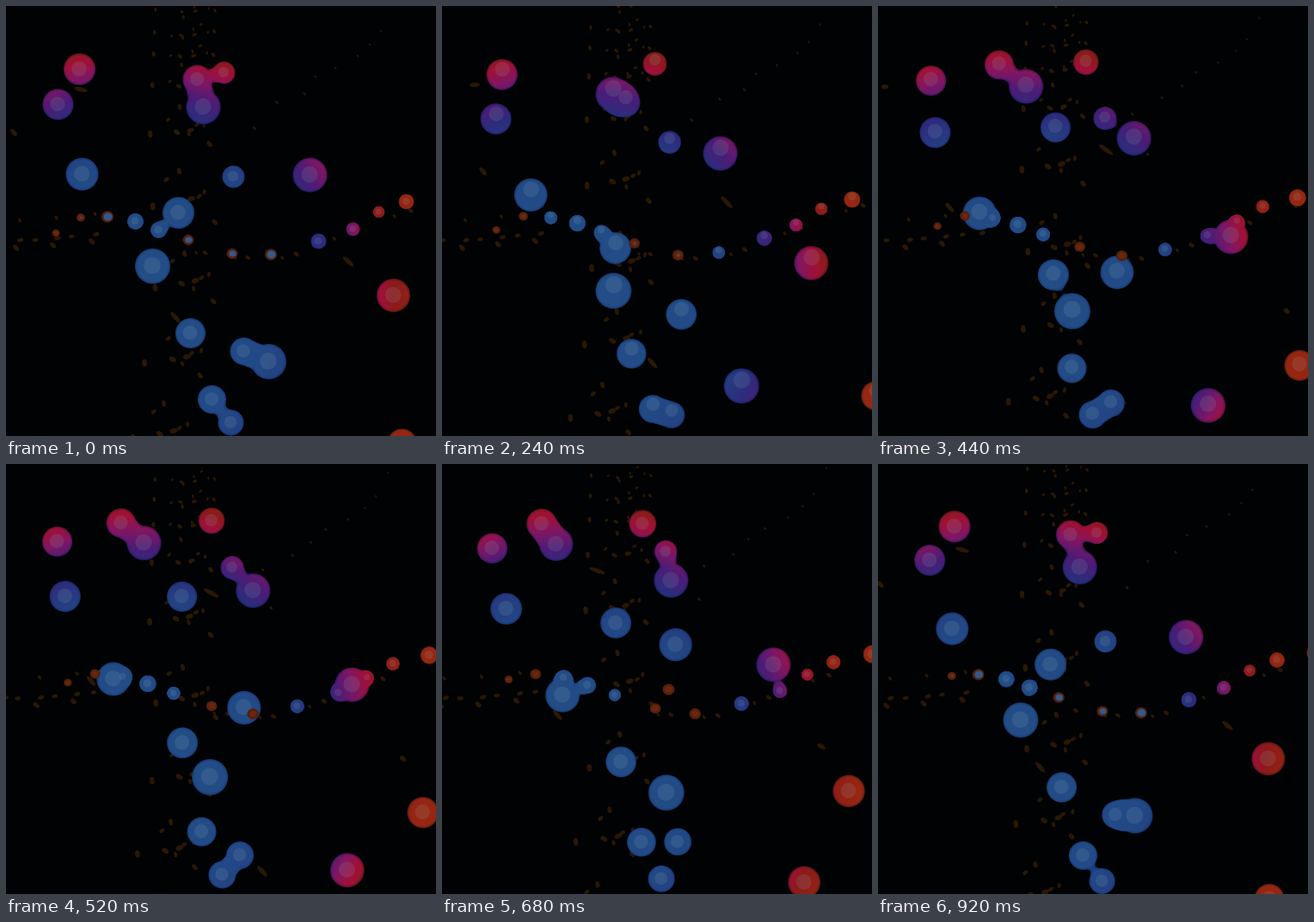
An HTML page with a canvas for the animation above (0.96 s loop, 500x500 px).

```html
<!DOCTYPE html>
<html lang="en">
<head>
<meta charset="utf-8">
<title>Metaball streams</title>
<style>
  html, body { margin: 0; width: 100%; height: 100%; overflow: hidden; background: #010203; }
  canvas { display: block; width: 500px; height: 500px; }
</style>
</head>
<body>
<canvas id="stage" width="500" height="500"></canvas>
<script>
const SIZE = 500, LOOP = 960, STEP = 40;
const SPREAD = 1.6;                              // reach of a ball relative to its radius
const EDGE = (1 - 1 / SPREAD ** 2) ** 2;         // field value on the surface
const TAU = Math.PI * 2;

const ctx = document.getElementById('stage').getContext('2d');
const layer = document.createElement('canvas');
layer.width = layer.height = SIZE;
const layerCtx = layer.getContext('2d');
const image = layerCtx.createImageData(SIZE, SIZE);
const field = new Float32Array(SIZE * SIZE);

const clamp = (v, lo = 0, hi = 1) => Math.min(hi, Math.max(lo, v));

// A path is a row of x, y, r points, one every `step` ms.
// A new ball sets off every loop, so each path carries several at once.
function path(step, points, born = -Infinity, die = Infinity) {
  const n = points.length / 3;
  return { step, points, n, born, die, length: (n - 1) * step };
}

const upperArc = path(480, [
  168, 70, 17,   137, 68, 17,   85, 73, 18.5,  60, 88, 17.5,
  60, 114, 18,   67, 150, 18,   88, 195, 19,   121, 245, 19.5,
  170, 302, 20.5, 231, 359, 21, 305, 413, 20.5, 390, 468, 20,
  460, 508, 17,  520, 545, 17
], 250);

const rightArc = path(480, [
  516, 485, 16,  487, 411, 18,  450, 336, 19.5, 406, 262, 20,
  353, 196, 20,  292, 150, 20,  229, 117, 20,   166, 92, 20,
  92, 98, 19
], -Infinity, 3790);

const spiral = path(480, [
  263, 335, 13,  263, 302, 13,  264, 198, 13,  263, 125, 13.5,
  253, 77, 13,   240, 65, 15,   222, 85, 17,   205, 147, 17.5,
  200, 240, 18.5, 204, 318, 18, 214, 380, 17.5, 226, 424, 17,
  239, 457, 16.5, 250, 476, 16, 261, 484, 15,  271, 458, 16,
  276, 401, 16,  277, 297, 19.5, 262, 95, 18
], 600, 8590);

const beads = path(960, [
  58, 264, 4.5,  87, 246, 5,    118, 245, 7,   150, 250, 9.5,
  177, 260, 9.5, 212, 272, 6.5, 263, 288, 6.5, 308, 289, 7,
  363, 273, 9,   403, 259, 8,   433, 239, 7,   465, 227, 9,
  510, 219, 11
]);

const streaks = [
  path(480, [-110, 0, 5, -60, 70, 5, 9, 147, 5, 91, 243, 7, 197, 362, 8, 290, 465, 8, 380, 560, 8]),
  path(480, [560, 440, 4, 468, 348, 4, 398, 297, 8, 252, 158, 10, 87, 97, 8, 2, 94, 4, -60, 95, 4])
];

const plume = path(960, [
  180, 540, 3, 188, 460, 3, 205, 375, 3, 210, 285, 3, 203, 190, 3,
  205, 120, 2.6, 207, 75, 2.2, 208, 45, 2, 209, 22, 1.8, 210, -5, 1.6
]);
const inflow = path(960, [-12, 266, 3, 28, 266, 3, 70, 262, 3, 112, 258, 3]);
const outflow = path(960, [225, 282, 2.6, 270, 288, 2.6, 325, 288, 2.8, 385, 266, 2.8, 455, 240, 2.8, 520, 218, 2.6]);
const drift = path(960, [
  336, 194, 1.8, 289, 142, 1.8, 315, 112, 1.6, 347, 102, 1.6, 360, 82, 1.4, 383, 72, 1.4,
  409, 58, 1.3, 423, 45, 1.3, 436, 29, 1.2, 450, -3, 1.2
]);

// Catmull-Rom through the points
function sample(p, t) {
  const i = Math.min(p.n - 2, Math.floor(t / p.step));
  const u = t / p.step - i;
  return [0, 1, 2].map(c => {
    const at = k => p.points[clamp(k, 0, p.n - 1) * 3 + c];
    const a = at(i - 1), b = at(i), d = at(i + 1), e = at(i + 2);
    return b + u * ((d - a) / 2 + u * (a - 2.5 * b + 2 * d - e / 2 + u * (1.5 * (b - d) + (e - a) / 2)));
  });
}

function travellers(p, time, phase = 0) {
  const out = [];
  for (let t = (time + phase) % LOOP; t < p.length; t += LOOP) {
    const [x, y, r] = sample(p, t);
    const life = clamp((t - p.born) / 150) * clamp((p.die - t) / 150);
    if (r * life > 2 || p.born === -Infinity && life === 1) out.push({ x, y, r: r * life, t });
  }
  return out;
}

function generator(seed) {
  return () => {
    seed = (seed * 1664525 + 1013904223) >>> 0;
    return seed / 4294967296;
  };
}

const random = generator(41);
function lanes(p, count, spreadX, spreadY) {
  return Array.from({ length: count }, () => ({
    p,
    phase: random() * LOOP,
    dx: (random() + random() - 1) * spreadX,
    dy: (random() - 0.5) * spreadY,
    size: 0.7 + random() * 0.5,
    tilt: random() * 3
  }));
}
const specks = [
  ...lanes(plume, 9, 38, 30),
  ...lanes(inflow, 4, 20, 46),
  ...lanes(outflow, 2, 10, 16),
  { p: drift, phase: 0, dx: 0, dy: 0, size: 1, tilt: 0.8 }
];

// Colour follows the distance from a point left of the middle
const HUB = { x: 150, y: 345 };
const stops = [
  [0, 36, 78, 134], [150, 34, 74, 134], [195, 36, 64, 130], [225, 44, 44, 124],
  [248, 76, 28, 118], [268, 128, 22, 98], [285, 160, 16, 56],
  [300, 140, 26, 26], [335, 150, 38, 18], [600, 150, 44, 16]
];
const ramp = Array.from({ length: 600 }, (_, d) => {
  const i = stops.findIndex(s => s[0] > d);
  const a = stops[i - 1], b = stops[i];
  const u = (d - a[0]) / (b[0] - a[0]);
  return [1, 2, 3].map(c => a[c] + (b[c] - a[c]) * u);
});
const hubDistance = (x, y) => Math.hypot(x - HUB.x, y - HUB.y);

function addBall({ x, y, r }) {
  const reach = r * SPREAD, inv = 1 / (reach * reach);
  const x0 = Math.max(0, Math.ceil(x - reach)), x1 = Math.min(SIZE - 1, Math.floor(x + reach));
  const y0 = Math.max(0, Math.ceil(y - reach)), y1 = Math.min(SIZE - 1, Math.floor(y + reach));
  for (let py = y0; py <= y1; py++) {
    for (let px = x0; px <= x1; px++) {
      const q = 1 - ((px - x) ** 2 + (py - y) ** 2) * inv;
      if (q > 0) field[py * SIZE + px] += q * q;
    }
  }
}

function paintField() {
  const data = image.data;
  for (let i = 0; i < field.length; i++) {
    const over = field[i] - EDGE;
    const o = i * 4;
    if (over < -0.03) { data[o + 3] = 0; continue; }
    const [r, g, b] = ramp[hubDistance(i % SIZE, Math.floor(i / SIZE)) | 0];
    const body = clamp(over / 0.14);
    data[o] = r * (0.6 + 0.4 * body);
    data[o + 1] = g * (0.78 + 0.22 * body);
    data[o + 2] = b * (0.88 + 0.12 * body);
    data[o + 3] = 255 * clamp(over * 18 + 0.5);
  }
  layerCtx.putImageData(image, 0, 0);
  ctx.drawImage(layer, 0, 0);
}

function oval(x, y, rx, ry, tilt, fill) {
  ctx.fillStyle = fill;
  ctx.beginPath();
  ctx.ellipse(x, y, rx, ry, tilt, 0, TAU);
  ctx.fill();
}

function paintSpecks(time) {
  for (const s of specks) {
    for (const { x, y, r } of travellers(s.p, time, s.phase)) {
      const w = r * s.size;
      oval(x + s.dx, y + s.dy, w * 1.25, w * 0.8, s.tilt, '#2a1703');
    }
  }
  for (const p of streaks) {
    for (const { x, y, r, t } of travellers(p, time)) {
      const [nx, ny] = sample(p, Math.min(p.length, t + 20));
      oval(x, y, r, 2.6, Math.atan2(ny - y, nx - x), '#291803');
    }
  }
}

function paintEmber({ x, y, r }, time) {
  oval(x, y, r, r * 0.95, 0, '#54200c');
  oval(x, y, r * 0.6, r * 0.55, 0, '#6a260e');
  const core = Math.max(0, r - 4.5) * 2 * clamp(0.35 + Math.cos(time / LOOP * TAU));
  if (core > 0.5) oval(x + 0.5, y, core, core * 0.9, 0, '#34588c');
}

function draw(time) {
  ctx.fillStyle = '#010203';
  ctx.fillRect(0, 0, SIZE, SIZE);
  paintSpecks(time);

  const all = [upperArc, rightArc, spiral, beads].flatMap(p => travellers(p, time));
  const isEmber = b => b.r < 7.2 && hubDistance(b.x, b.y) < 200;
  const balls = all.filter(b => !isEmber(b));

  field.fill(0);
  balls.forEach(addBall);
  paintField();

  // the light leans upwards early in the loop
  const lean = Math.exp(-(((time - 280) / 130) ** 2)) * 0.34;
  for (const { x, y, r } of balls) {
    oval(x + r * lean * 0.15, y - r * lean, r * 0.48, r * 0.48, 0, 'rgba(150,185,185,0.14)');
  }
  all.filter(isEmber).forEach(b => paintEmber(b, time));
}

const start = performance.now();
let shown = -1;
function tick() {
  const elapsed = Math.max(0, performance.now() - start) % LOOP;
  const time = Math.floor(elapsed / STEP) * STEP;
  if (time !== shown) draw(shown = time);
  requestAnimationFrame(tick);
}
tick();
</script>
</body>
</html>
```
